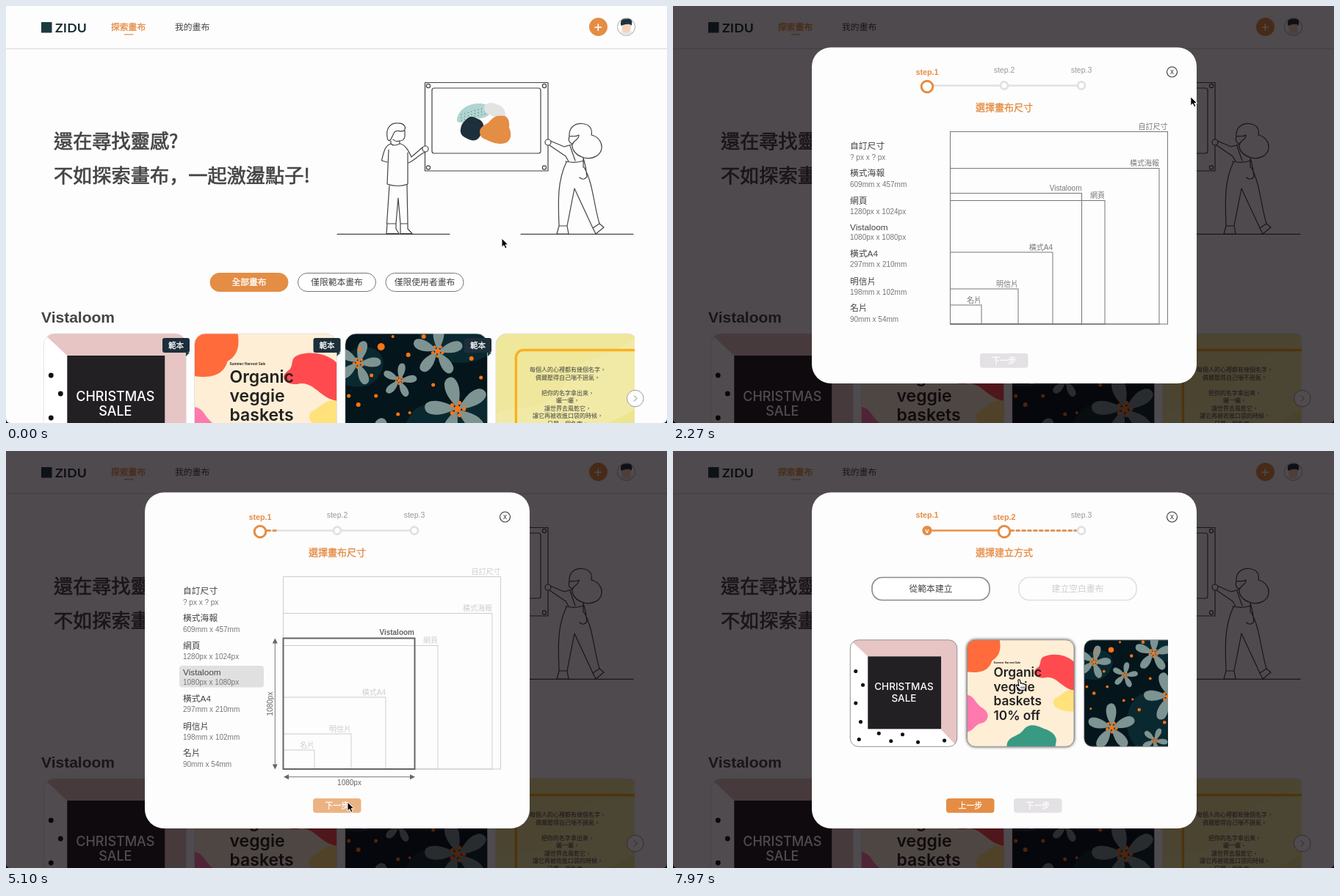
An HTML page that plays this animation: 900 by 569 pixels, repeating every 8 s.

```html
<!DOCTYPE html>
<html lang="zh-Hant">
<head>
<meta charset="utf-8">
<style>
html,body{margin:0;width:100%;height:100%;overflow:hidden;background:#fefdfe}
svg{display:block;width:100vw;height:100vh}
text{font-family:"Liberation Sans","Noto Sans CJK TC","Noto Sans CJK",sans-serif}
.cjk{font-family:"Noto Sans CJK TC","Noto Sans CJK",sans-serif;stroke:currentColor;stroke-width:.026em}
.inter{font-family:Inter,sans-serif}
.mid{text-anchor:middle}
.end{text-anchor:end}
.line{fill:none;stroke:#444;stroke-width:1.2;stroke-linejoin:round;stroke-linecap:round}
</style>
</head>
<body>
<svg id="stage" viewBox="0 0 900 569" xmlns="http://www.w3.org/2000/svg"></svg>
<script>
const LOOP = 8000, ORANGE = '#e48d44', INK = '#444', PALE = '#e3e1e4', NAVY = '#1c2f3a';
const stage = document.getElementById('stage');

const text = (x, y, size, fill, str, cls = '', extra = '') =>
  `<text x="${x}" y="${y}" font-size="${size}" fill="${fill}" color="${fill}" class="${cls}" ${extra}>${str}</text>`;
const rect = (x, y, w, h, r, fill, extra = '') =>
  `<rect x="${x}" y="${y}" width="${w}" height="${h}" rx="${r}" fill="${fill}" ${extra}/>`;
const circle = (x, y, r, fill, extra = '') => `<circle cx="${x}" cy="${y}" r="${r}" fill="${fill}" ${extra}/>`;
const path = (d, fill, extra = '') => `<path d="${d}" fill="${fill}" ${extra}/>`;
const stroke = (color, w = 1) => `stroke="${color}" stroke-width="${w}"`;
const group = (id, body, extra = '') => `<g id="${id}" ${extra}>${body}</g>`;
const dots = (list, fill) => list.map(([x, y, r = 3.4]) => circle(x, y, r, fill)).join('');

/* Card artwork, each 194 x 194 */
const xmasCard = rect(0, 0, 194, 194, 0, '#fff') +
  path('M0 0H194V194L165 163V30H32Z', '#e6c5c4') + rect(32, 30, 133, 132, 0, '#222022') +
  text(97.5, 91.5, 18, '#fff', 'CHRISTMAS', 'inter mid', 'font-weight="500"') +
  text(97.5, 112, 18, '#fff', 'SALE', 'inter mid', 'font-weight="500"') +
  dots([[10, 57], [23, 82], [10, 115], [19, 149], [16, 181], [52, 170], [74, 184], [95, 172], [123, 186], [171, 183]], '#111');

const veggieCard = rect(0, 0, 194, 194, 0, '#feeed5') +
  path('M0 0H59C63 22 55 32 45 38C42 48 34 63 0 58Z', '#ff6b3b') +
  path('M194 40C178 24 150 24 138 31C130 36 136 46 127 51C115 60 124 70 140 69C162 63 170 88 194 92Z', '#ff4b50') +
  path('M194 92C180 88 172 100 160 106C150 114 160 132 194 130Z', '#ffe27c') +
  path('M0 100C14 102 14 116 28 124C44 134 38 150 24 152C12 156 12 166 0 167Z', '#ff79ae') +
  path('M72 194C72 174 92 178 102 164C112 150 128 156 136 160C146 164 160 168 162 182L160 194Z', '#389a82') +
  text(48, 43, 4.7, '#111', 'Summer Harvest Sale', 'inter', 'font-weight="600"') +
  ['Organic', 'veggie', 'baskets', '10% off'].map((s, i) =>
    text(48, 67 + i * 26, 23, '#222', s, 'inter', 'font-weight="600"')).join('');

function flower(x, y, size, turn) {
  let s = '';
  for (let i = 0; i < 5; i++) {
    s += path('M0 0C.2 -.06 .5 -.32 .85 -.22C1 -.16 1.04 .02 .93 .1C.7 .26 .3 .16 0 0Z',
      '#7d9493', `transform="rotate(${turn + i * 72}) scale(${size})"`);
    const a = (turn + i * 72 + 30) * Math.PI / 180;
    s += circle(Math.cos(a) * size * .2, Math.sin(a) * size * .2, size * .06, '#ff7414');
  }
  return `<g transform="translate(${x} ${y})">${s}${circle(0, 0, size * .1, '#ff7414')}</g>`;
}
const flowerCard = rect(0, 0, 194, 194, 0, '#05151c') +
  path('M0 30C30 5 60 25 50 50S20 75 0 70ZM90 110C110 80 160 110 194 85V194H95C70 170 75 130 90 110ZM100 0H194V30C160 50 110 40 100 0Z', '#0a282f') +
  flower(18, 40, 31, 0) + flower(74, 64, 24, -5) + flower(126, 24, 35, 60) +
  flower(153, 103, 45, 42) + flower(50, 159, 44, 55) + flower(128, 183, 24, 10) +
  dots([[49, 18, 5], [36, 57, 2.5], [86, 29, 3], [65, 4, 2], [107, 4, 3], [18, 97, 3], [5, 85, 2.5], [42, 85, 2.5],
    [88, 108, 2], [172, 34, 3], [185, 60, 2.5], [100, 127, 3], [72, 110, 2.5], [12, 125, 2], [120, 70, 2.5], [20, 21, 2.5], [146, 150, 3]], '#ff7414');

const poem = ['每個人的心裡都有幾個名字，', '偶爾壓得自己喘不過氣。', '', '把你的名字拿出來，', '曬一曬，',
  '讓世界去風乾它，', '讓它再被收進口袋的時候，', '只是一個名字。'];
const poemCard = rect(0, 0, 194, 194, 0, '#efe79c') +
  path('M0 110C40 90 60 120 100 60C120 20 160 40 194 0V194H0Z', '#f1eaa6') + path('M20 194C50 130 120 150 194 100V194Z', '#ece48f') +
  `<rect x="27.5" y="22.5" width="190" height="190" rx="10" fill="none" ${stroke('#f9b120', 3.4)}/>` +
  poem.map((s, i) => text(98, 52 + i * 10.5, 8, '#444', s, 'mid')).join('');

const cards = [xmasCard, veggieCard, flowerCard, poemCard];
const defs = '<defs><clipPath id="cardClip"><rect width="194" height="194" rx="15"/></clipPath>' +
  '<clipPath id="rowClip"><rect x="0" y="400" width="856" height="169"/></clipPath>' +
  '<clipPath id="pickClip"><rect x="230" y="150" width="444" height="365"/></clipPath>' +
  '<filter id="glow" x="-10%" y="-10%" width="120%" height="120%"><feDropShadow dx="0" dy="0" stdDeviation="2.8" flood-color="#000" flood-opacity=".9"/></filter>' +
  cards.map((c, i) => group('card' + i, c, 'clip-path="url(#cardClip)"')).join('') + '</defs>';

/* Page */
const header = rect(48, 22, 14.5, 14.5, 0, '#1d3a43') +
  text(67, 36.3, 17.6, '#1d2f38', 'ZIDU', '', 'style="font-family:Lato,sans-serif" font-weight="700" letter-spacing=".2"') +
  text(143, 33, 11.8, ORANGE, '探索畫布', 'cjk') + rect(161, 38.3, 12.5, 1.2, 0, ORANGE) +
  text(230, 33, 11.8, INK, '我的畫布') + rect(0, 57.7, 900, 1.2, 0, '#dcdadc') +
  circle(844.5, 28.5, 12, '#fff', stroke('#aaa')) +
  path('M835.5 35.5C838 33 851 33 853.5 35.5C850 41 839 41 835.5 35.5Z', '#e9e4e0') +
  rect(838.5, 22, 12, 14, 5.5, '#f6d2b9') +
  path('M837.5 27C835 18 841 17 845 17.5C851 16.5 854 20 851.5 27C850 23 841 25 837.5 27Z', '#20333c');

const man = 'M519 178C517 166 525 159 533 160C541 159 546 165 542 170C538 173 533 168 529 172C526 176 526 181 522 184C519 183 519 180 519 178' +
  'M543 170V178Q542 184 536 184Q530 186 527 182M524 184V188M536 184V188C530 191 526 190 524 188C516 190 514 200 511.5 211L519 213' +
  'M521 196L519 243Q534 248 547 243V200M537 188C545 190 549 200 552 206L567 193M548 214C556 211 562 203 571 199' +
  'M522 245L518.5 297M546 244L547 297M534 262L531 297M534 262L537 297M519 297H531V304L535 310.5H518ZM537 297H547V304L553 310.5H537Z';
const woman = 'M767 178C766 165 775 160 784 160.5C794 161 799 167 797 176C806 178 812 186 811 194C810 204 798 210 787 207C776 204 770 196 771 189C773 183 781 182 780 176C776 179 771 177 767 178' +
  'C765 184 768 188 772 188M741 184L760 192L771 189M740 190L762 205M762 205L766 212M768 191L775 211M786 207Q790 220 791 233Q786 239 781 234M786 207V220' +
  'M762 212Q775 215 787 211M763 213C750 240 752 270 753 300H764L774 249L799 303L808 297C800 270 799 240 787 220M753 300L750 311H766L764 300M799 303L803 311L814 302L808 297';
let speckle = '';
for (let i = 0; i < 24; i++) speckle += circle(620 + i % 8 * 4.6, 150 - i % 8 * 1.3 + (i >> 3) * 4 - 2, .5, '#1d3a43');
const hero = text(65, 194.3, 26.2, INK, '還在尋找靈感?', 'cjk') +
  text(65, 241, 26.2, INK, '不如探索畫布<tspan lang="zh-Hans" style="font-family:\'Noto Sans CJK SC\',sans-serif">，</tspan>一起激盪點子!', 'cjk') +
  path('M451 311.3H604M701 311.3H854' + man + woman, 'none', 'class="line"') +
  `<g class="line"><rect x="570.5" y="104.5" width="167.5" height="120.5"/><rect x="580" y="112" width="148" height="89" rx="3"/></g>` +
  [[575, 109], [733, 109], [575, 220.5], [733, 220.5]].map(([x, y]) => circle(x, y, 2.6, '#fff', 'class="line"')).join('') +
  circle(571, 195, 4, '#fff', stroke(INK, 1.2)) + circle(738, 186, 4, '#fff', stroke(INK, 1.2)) +
  path('M614 157C614 145 625 134 642 133C656 132 664 140 658 148C650 156 640 152 632 156C624 160 616 160 614 157Z', '#b0d5d0') + speckle +
  path('M619 168C620 160 624 157 630 152C636 149 640 154 645 155C652 160 652 168 646 176C642 186 634 184 628 181C621 178 618 174 619 168Z', NAVY) +
  path('M651 138C653 132 661 131 668 134C676 136 681 142 680 151C674 156 666 152 660 149C654 147 650 143 651 138Z', '#e3e3e3') +
  path('M645 171C646 164 652 163 658 158C663 152 668 149 674 150C684 148 686 158 685 166C689 174 688 184 680 187C668 190 660 185 653 182C647 180 645 176 645 171Z', ORANGE);

const pills = [[278, '全部畫布', 1], [397.5, '僅限範本畫布'], [517, '僅限使用者畫布']].map(([x, s, on]) =>
  rect(x, 364.5, 106, 25, 12.5, on ? ORANGE : '#fff', stroke(on ? ORANGE : '#777')) +
  text(x + 53, 381.2, 11.8, on ? '#fff' : INK, s, on ? 'cjk mid' : 'mid')).join('');

const badge = x => path(`M${x + 32} 473H${x + 37}L${x + 32} 478Z`, '#12423f') + rect(x, 453, 37, 20, 3, NAVY) +
  text(x + 18.5, 466.8, 10.6, '#fff', '範本', 'cjk mid');
const row = '<g clip-path="url(#rowClip)">' + cards.map((c, i) =>
  `<g transform="translate(${51.3 + i * 205.2} 447)"><use href="#card${i}"/><rect width="194" height="194" rx="15" fill="none" ${stroke('#ddd', .8)}/></g>`).join('') +
  '</g>' + [213, 418.5, 624].map(badge).join('') +
  circle(856.8, 535.5, 11.3, '#fff', stroke('#999')) + path('M855 531.5L859 535.5L855 539.5', 'none', stroke('#777'));

const addButton = rect(794, 16, 25, 25, 12.5, ORANGE, 'id="pill"') +
  text(773.5, 33, 11.8, '#fff', '新增畫布', 'mid', 'id="addText"') +
  path('', 'none', `id="plus" ${stroke('#fff', 1.6)}`) + path('M736 29H741', 'none', `id="minus" ${stroke('#fff', 1.6)}`);

const page = rect(0, 0, 900, 569, 0, '#fefdfe') + header + addButton + hero + pills +
  text(48, 432, 21, INK, 'Vistaloom', '', 'font-weight="700"') + row;

/* Dialog */
const sizes = [
  ['自訂尺寸', '? px x ? px', 195, 673.5, 171.5], ['橫式海報', '609mm x 457mm', 232, 662, 221.5],
  ['網頁', '1280px x 1024px', 269.5, 588, 265.5], ['Vistaloom', '1080px x 1080px', 306, 556.5, 255.5],
  ['橫式A4', '297mm x 210mm', 341.5, 517, 336], ['明信片', '198mm x 102mm', 379.5, 470, 386], ['名片', '90mm x 54mm', 416, 420, 408]];
const MAIN = 3;
const box = (r, t, color, w) => `<rect x="377.5" y="${t}" width="${r - 377.5}" height="${434 - t}" fill="none" ${stroke(color, w)}/>`;
const outline = ([name, , , r, t]) => box(r, t, '#777', 1) + text(r, t - 3.2, 10, '#777', name, 'end');
const button = (x, str, fill, id = '') => rect(x, 474, 65.5, 19.8, 4, fill, id) + text(x + 32.8, 488, 10.8, '#fff', str, 'cjk mid');
const step = (x, n, big, on) => text(x, big ? 93.5 : 91, big || on ? 10.8 : 10.5, on ? ORANGE : '#999', 'step.' + n, 'mid', on ? 'font-weight="700"' : '') +
  circle(x, big ? 110 : 108.5, big ? 7.8 : 5, '#fff', stroke(big ? ORANGE : PALE, 3));
const track = (x, id) => rect(x, 107.3, 96, 2.6, 0, PALE) +
  `<line id="${id}" x1="${x + 4}" x2="${x + 4}" y1="108.6" y2="108.6" ${stroke(ORANGE, 2.6)} stroke-dasharray="5.5 2.4"/>`;
const title = s => text(451, 142.5, 13, ORANGE, s, 'cjk mid');

const stepOne = track(351, 'dashA') + rect(456, 107.3, 96, 2.6, 0, PALE) +
  step(346, 1, true, true) + step(451, 2) + step(556, 3) + title('選擇畫布尺寸') +
  rect(236, 293, 115, 29.5, 4, '#e1e0e1', 'id="mark"') +
  sizes.map(([name, dim, y]) => text(241, y, 11.8, INK, name) + text(241, y + (name === 'Vistaloom' ? 13.2 : 14.5), 10, '#777', dim)).join('') +
  group('others', sizes.filter((s, i) => i !== MAIN).map(outline).join('')) +
  group('mainThin', outline(sizes[MAIN])) +
  group('mainBold', box(556.5, 255.5, 'currentColor', 2) + text(556, 251, 10, '#666', 'Vistaloom', 'end', 'font-weight="700"') +
    path('M380 444.7H555M366.3 258V432', 'none', stroke('#777')) +
    path('M378 444.7L385 441.2V448.2ZM557 444.7L550 441.2V448.2ZM366.3 255.5L362.8 262.5H369.8ZM366.3 434.5L362.8 427.5H369.8Z', '#666') +
    text(467.5, 456, 10, '#666', '1080px', 'mid') + text(0, 0, 10, '#666', '1080px', 'mid', 'transform="translate(363 345) rotate(-90)"')) +
  rect(418, 474, 65.5, 19.8, 4, PALE, 'id="nextGrey"') + button(418, '下一步', ORANGE, 'id="next"');

const option = (id, x, label, icon) => group(id, `<rect x="${x}" width="160" rx="14" fill="#fff" ${stroke('#8b898b', 1.6)}/>` +
  `<g>${icon}</g>` + text(x + 80, 0, 11.8, INK, label, 'mid'));
const picture = circle(347, 10, 4.8, '#fff', stroke('#777', 2.4)) +
  path('M330.5 1.5H373V29.5H330.5ZM331 26L341 16L351 26L361 14L373 27', 'none', stroke('#777', 2.8));
const brush = path('M530.5 1.5H573V29.5H530.5Z', 'none', stroke('#777', 2.8)) +
  path('M560 5L548 17L551 20ZM547 18C543 19 544 23 541 25C546 26 550 24 550 21Z', '#666');
const stepTwo = rect(351, 107.3, 96, 2.4, 0, ORANGE) + track(455, 'dashB') +
  step(346, 1, false, true) + circle(346, 108.5, 6.6, ORANGE) + text(346, 111.6, 9.5, '#fff', 'v', 'mid', 'font-weight="700"') +
  step(451, 2, true, true) + step(556, 3) + title('選擇建立方式') +
  button(372, '上一步', ORANGE) + button(464, '下一步', PALE) +
  option('optA', 271, '從範本建立', picture) + option('optB', 471, '建立空白畫布', brush) +
  '<g clip-path="url(#pickClip)">' + group('picks', [0, 1, 2].map(i =>
    `<g transform="translate(${241.3 + i * 159.2} 0) scale(.75)"><rect id="lift${i}" width="194" height="194" rx="15" fill="#fff" filter="url(#glow)" opacity="0"/>` +
    `<use href="#card${i}"/><rect width="194" height="194" rx="15" fill="none" ${stroke('#888', 1.2)}/></g>`).join('')) + '</g>';

const dialog = rect(189, 56.5, 524, 458.5, 26, '#fefdfe') +
  circle(679.5, 90, 7, '#fff', stroke('#333', 1.1)) + text(679.5, 93.2, 10, '#333', 'x', 'mid') +
  group('one', stepOne) + group('two', stepTwo);

const arrow = path('M0 0V12.2L2.8 9.6L4.8 14L7 13L5 8.8H8.8Z', '#000', stroke('#fff', 1));
const hand = path('M-1.2 1C-1 -.6 1 -.6 1.4 1L2.4 5C3.4 4.3 4.4 4.6 4.8 5.6C5.8 5 6.8 5.4 7 6.3C8.2 5.8 9.2 6.5 9.3 7.6C9.8 10 9.2 12 8.2 14.2H1.4C-.6 12 -2.2 10.4 -3.8 8.2C-3.8 6.8 -2.2 6.6 -.2 8.4Z', '#fff', stroke('#000', 1.1)) +
  path('M3 9.5V12M5 9.5V12M7 9.5V12', 'none', stroke('#000', .8));

stage.innerHTML = defs + page + rect(0, 0, 900, 569, 0, '#080206', 'id="shade"') + group('dialog', dialog) +
  path('M0 563V569H6Q0 569 0 563ZM900 563V569H894Q900 569 900 563Z', '#000') + group('pointer', group('arrow', arrow) + group('hand', hand));

const el = {};
stage.querySelectorAll('[id]').forEach(n => el[n.id] = n);
const set = (n, attrs) => { for (const k in attrs) n.setAttribute(k, attrs[k]); };
const show = (n, on) => n.setAttribute('opacity', +on);

/* Motion */
const ramp = (t, a, b) => Math.min(1, Math.max(0, (t - a) / (b - a)));
const ease = (t, a, b) => { const p = ramp(t, a, b); return p * p * (3 - 2 * p); };
const mix = (a, b, p) => a + (b - a) * p;
const between = (t, a, b) => t >= a && t < b;

const route = [[0, 675, 317], [150, 675, 317], [840, 789, 59], [900, 789, 59], [1080, 796, 29], [1850, 796, 29], [2900, 538, 297],
  [4450, 538, 297], [4980, 465, 479], [5600, 465, 479], [6120, 390, 292], [6520, 390, 292], [7150, 471, 312], [8000, 471, 312]];
const handTimes = [[960, 1880], [2550, 4560], [5150, 5500], [5960, 6400], [6900, 8000]];

function pointer(t) {
  let i = 0;
  while (i < route.length - 2 && t >= route[i + 1][0]) i++;
  const [a, b] = [route[i], route[i + 1]], p = ease(t, a[0], b[0]);
  set(el.pointer, { transform: `translate(${mix(a[1], b[1], p)} ${mix(a[2], b[2], p)})` });
  const isHand = handTimes.some(([s, e]) => between(t, s, e));
  show(el.hand, isHand);
  show(el.arrow, !isHand);
}

function placeOption(node, top, h) {
  const [frame, icon, label] = node.children, spare = Math.max(0, h - 92) / 2;
  set(frame, { y: top, height: h });
  set(icon, { transform: `translate(0 ${top + 22 + (h - 92) / 2})`, opacity: ramp(h, 56, 88) });
  set(label, { y: top + h - 11.8 - spare });
}

function draw(t) {
  const open = ease(t, 1000, 1300) * (1 - ease(t, 1900, 2200));
  set(el.pill, { x: 794 - 65.5 * open, width: 25 + 65.5 * open });
  show(el.addText, ramp(open, .5, 1));
  show(el.minus, ramp(open, .5, 1));
  const arm = mix(4.8, 2.5, open), up = 4.8 * (1 - open), cx = mix(806.3, 808.5, open);
  set(el.plus, { d: `M${cx - arm} 29H${cx + arm}` + (up > .1 ? `M${cx} ${29 - up}V${29 + up}` : '') });

  const modal = ease(t, 1850, 2120);
  show(el.shade, modal * .71);
  show(el.dialog, modal);

  const second = t >= 5500;
  show(el.one, !second);
  show(el.two, second);

  const chosen = ease(t, 4450, 4650), hover = t >= 2550;
  show(el.mark, chosen);
  show(el.others, mix(1, .35, chosen));
  show(el.mainThin, !hover);
  show(el.mainBold, hover);
  el.mainBold.style.color = t < 4450 ? '#333' : '#666';
  show(el.nextGrey, 1 - chosen);
  show(el.next, chosen * mix(.66, 1, ramp(t, 5110, 5300)));
  set(el.dashA, { x2: 355 + 92 * ramp(t, 5050, 5380) });
  set(el.dashB, { x2: 459 + 92 * ramp(t, 6130, 6440) });

  const p = ease(t, 6300, 6709), top = mix(212, 172.5, p), h = mix(128, 31, p);
  placeOption(el.optA, top, h);
  placeOption(el.optB, top, h);
  show(el.optB, mix(1, .25, ramp(t, 6300, 6700)));
  set(el.picks, { transform: `translate(0 ${top + h + 54.3})`, opacity: ramp(t, 6300, 6420) });
  show(el.lift1, ramp(t, 6900, 7100));
  pointer(t);
}

function tick(now) {
  draw(now % LOOP);
  requestAnimationFrame(tick);
}
draw(0);
requestAnimationFrame(tick);
</script>
</body>
</html>
```
